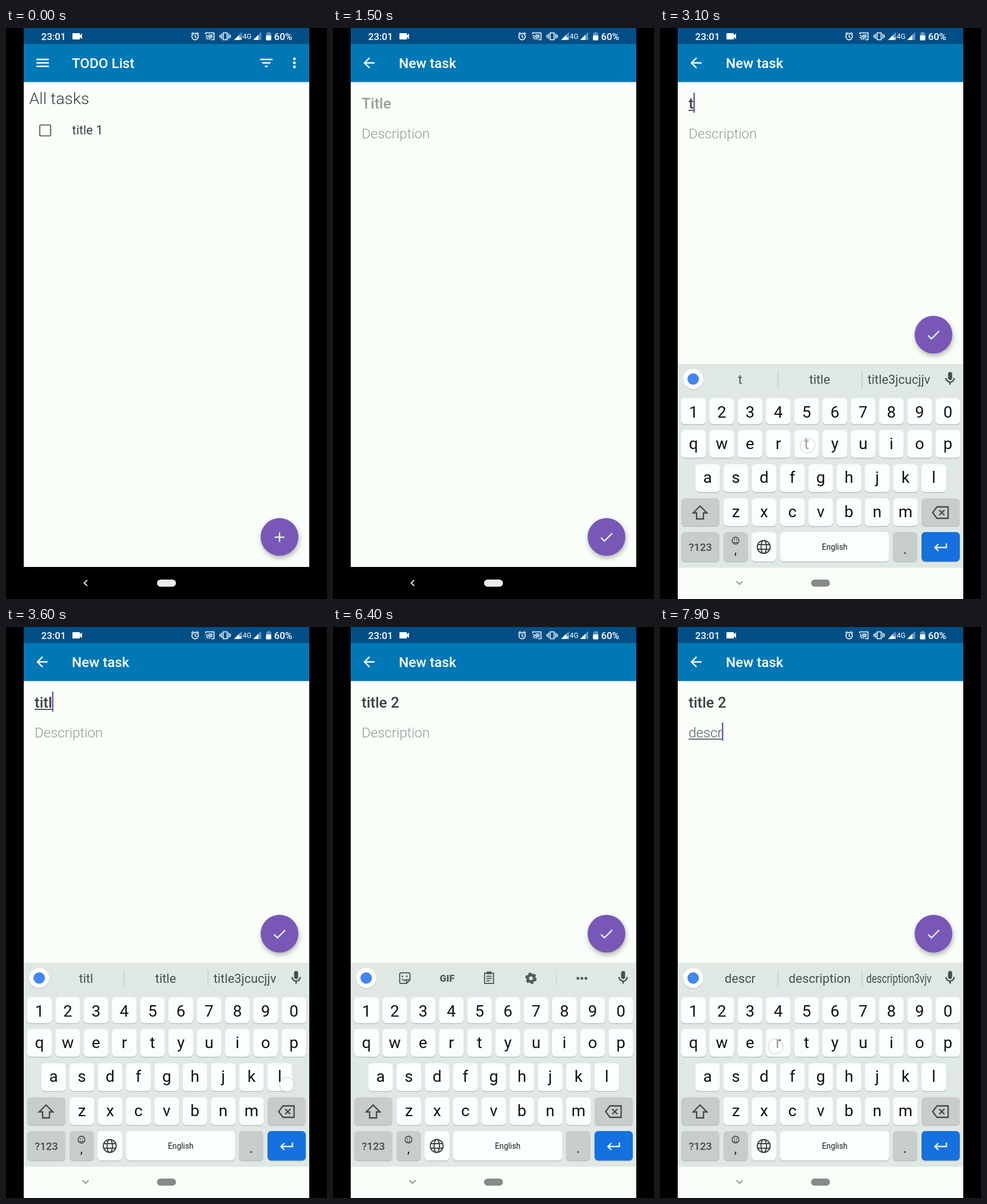
An HTML page that plays this animation: 561 by 998 pixels, repeating every 8000 ms.

```html
<!DOCTYPE html>
<html lang="en">
<head>
<meta charset="utf-8">
<title>New task</title>
<style>
html, body { margin: 0; width: 100%; height: 100%; overflow: hidden; background: #000; }
svg { display: block; width: 561px; height: 998px; font-family: Roboto, sans-serif; }
.mid { text-anchor: middle; }
.line { fill: none; stroke-width: 2; }
.fab { filter: drop-shadow(1px 4px 4px rgba(0, 0, 0, .3)); }
</style>
</head>
<body>
<svg id="stage" viewBox="0 0 561 998"></svg>
<script>
const LOOP = 8000, PAGE = '#f9fff8', BAR = '#0178b6', KEY = '#fafffb', DIM = '#c6cdcb', INK = '#545b5c';
const stage = document.getElementById('stage');
const $ = id => document.getElementById(id);

// Markup helpers
const text = (s, x, y, size, fill, weight = 400, extra = '') =>
  `<text x="${x}" y="${y}" font-size="${size}" fill="${fill}" font-weight="${weight}" ${extra}>${s}</text>`;
const mid = (s, x, y, size, fill, weight) => text(s, x, y, size, fill, weight, 'class="mid"');
const rect = (x, y, w, h, fill, r = 0, extra = '') =>
  `<rect x="${x}" y="${y}" width="${w}" height="${h}" rx="${r}" fill="${fill}" ${extra}/>`;
const disc = (x, y, r, fill, extra = '') => `<circle cx="${x}" cy="${y}" r="${r}" fill="${fill}" ${extra}/>`;
const line = (d, stroke, w = 2) => `<path class="line" d="${d}" stroke="${stroke}" style="stroke-width:${w}"/>`;
const icon = (d, x, y, fill = '#fff', s = 1.21) =>
  `<path d="${d}" fill="${fill}" transform="translate(${x} ${y}) scale(${s}) translate(-12 -12)"/>`;
const group = (id, body, extra = '') => `<g id="${id}" ${extra}>${body}</g>`;

const ICON = {
  menu: 'M3 18h18v-2H3zm0-5h18v-2H3zm0-7v2h18V6z',
  filter: 'M10 18h4v-2h-4zM3 6v2h18V6zm3 7h12v-2H6z',
  back: 'M20 11H7.83l5.59-5.59L12 4l-8 8 8 8 1.41-1.41L7.83 13H20z',
  check: 'M9 16.17L4.83 12l-1.42 1.41L9 19 21 7l-1.41-1.41z',
  add: 'M19 13h-6v6h-2v-6H5v-2h6V5h2v6h6z',
  video: 'M17 10.5V7q0-1-1-1H4q-1 0-1 1v10q0 1 1 1h12q1 0 1-1v-3.5l4 4v-11z',
  mic: 'M12 14c1.66 0 3-1.34 3-3V5a3 3 0 0 0-6 0v6c0 1.66 1.34 3 3 3zm5-3a5 5 0 0 1-10 0H5c0 3.5 2.6 6.4 6 6.9V21h2v-3.1c3.4-.5 6-3.4 6-6.9z'
};

function statusBar() {
  const signal = x => `<path d="M${x} 21h14v-14z" fill="#5f93bb"/><path d="M${x} 21h9v-9z" fill="#fff"/>`;
  return rect(31, 0, 499, 28, '#014f86') +
    text('23:01', 61.5, 21, 17, '#fff', 500) + icon(ICON.video, 124.5, 14.5, '#fff', .93) +
    disc(330.5, 15, 5.6, 'none', 'stroke="#fff" stroke-width="1.6"') +
    line('M330.5 11.5v4l2.5 1.5M324 10.5l3.5-3M337 10.5l-3.5-3', '#fff', 1.5) +
    line('M349 11v-2.5h14.5v12h-5M349 20v.5M349 16.5a4 4 0 0 1 4 4M349 13.2a7.3 7.3 0 0 1 7.3 7.3', '#fff', 1.6) +
    rect(354, 11, 7, 7, '#9dbdd6') +
    line('M379.5 8.5h7v12h-7zM376.6 10v9M389.4 10v9M374 12v5M392 12v5', '#fff', 1.6) +
    signal(398.5) + line('M407.5 16.5l4 4m0-4l-4 4', '#fff', 1.3) +
    text('4G', 413.5, 19, 12.5, '#fff') + signal(432) +
    rect(454.5, 8.5, 9, 13, '#5f93bb', 1) + rect(457, 7, 4, 2, '#5f93bb') + rect(454.5, 13, 9, 8.5, '#fff', 1) +
    text('60%', 468.5, 21, 17, '#fff', 500);
}

const fab = (id, d) => group(id, disc(478, 889.5, 33, '#7957b7', 'class="fab"') + icon(d, 478, 890, '#daf3df'));
const page = title => rect(31, 28, 499, 914, PAGE) + rect(31, 28, 499, 66.5, BAR) + text(title, 115, 70, 24.2, '#fff', 500);

const listPage = () => page('TODO List') + icon(ICON.menu, 64, 61) + icon(ICON.filter, 455, 61) +
  [54, 61, 68].map(y => disc(504, y, 2.4, '#fff')).join('') +
  text('All tasks', 40.5, 133, 28.5, '#383d3d', 300) +
  rect(59, 169.5, 19, 19, 'none', 2, 'stroke="#686c6c" stroke-width="2.2"') +
  text('title 1', 115.5, 186, 21.8, '#3d4141') + fab('addFab', ICON.add);

const field = (id, y, size, weight) => text('', 50, y, size, '#555', weight, `id="${id}" xml:space="preserve"`) +
  rect(50, y + 2.5, 0, 1.8, '#555', 0, `id="${id}Line"`);

const taskPage = () => page('New task') + icon(ICON.back, 63, 61) +
  field('title', 140.5, 26, 500) + field('desc', 192.5, 24, 300) +
  rect(0, 0, 2.4, 0, '#6c51a9', 0, 'id="cursor"') + fab('saveFab', ICON.check);

// Keyboard: keys sit on a grid of 49.4 px columns
const STEP = 49.4;
const key = (x, y, w, h, fill = KEY) => rect(x, y + 1.5, w, h, '#b9c1be', 6.5) + rect(x, y, w, h, fill, 6.5);
const keyRow = (letters, start, y, h, base) => [...letters].map((c, i) => {
  const x = 37 + (start + i) * STEP;
  return key(x, y, 43, h) + mid(c, x + 21.5, base, 28, '#111');
}).join('');

function toolbar() {
  return line('M119 604.5h13q2.5 0 2.5 2.5v10l-6 6h-9.500q-2.500 0-2.500-2.500v-13.500q0-2.500 2.500-2.500zM134 616.500h-5.500v6M120.500 615q4 5 7.500 1', INK) +
    disc(121.5, 610.5, 1.5, INK) + disc(129, 610.5, 1.5, INK) +
    mid('GIF', 199.5, 620, 17, INK, 900) +
    line('M265 605h15.500v18h-15.500zM268 610.500h9.500M268 614.500h9.500M268 618.500h6.500', INK) + rect(268.5, 602, 8.5, 5, INK, 1) +
    disc(346, 614, 5.8, 'none', `stroke="${INK}" stroke-width="5"`) +
    disc(346, 614, 8.6, 'none', `stroke="${INK}" stroke-width="3" stroke-dasharray="5 4.006"`) +
    rect(390, 601, 1, 26, '#c5cdca') + [428, 435, 442].map(x => disc(x, 614, 2.5, INK)).join('');
}

const hints = () => [206, 353].map(x => rect(x - .5, 600, 1.2, 28, '#b9c2bf')).join('') +
  [140, 279, 417.5].map((x, i) => `<g transform="translate(${x} 622)">${text('', 0, 0, 21.8, '#474e4f', 400, `class="mid" id="hint${i}"`)}</g>`).join('');

function keyboard() {
  return rect(31, 587, 499, 356, '#e0e8e4') +
    disc(58, 615, 17.5, '#c3cbc8') + disc(58, 613.5, 17.5, '#fdfffd') + disc(58, 613.5, 10, '#4285f4') +
    group('tools', toolbar()) + group('hints', hints()) + icon(ICON.mic, 507, 613, '#464d4e', 1.18) +
    keyRow('1234567890', 0, 647, 45.5, 681) + keyRow('qwertyuiop', 0, 702.5, 48.5, 736) +
    keyRow('asdfghjkl', .5, 762.5, 48.5, 795) + keyRow('zxcvbnm', 1.5, 822, 48.5, 854.5) +
    key(37, 822, 67, 48.5, DIM) + line('M70 835.500L58 847.500h6v10.500h12v-10.500h6z', '#414849', 2.3) +
    key(457, 822, 67, 48.5, DIM) + line('M476.500 847l7.500-10h19.500v20h-19.500zM488 842.500l9 9m0-9l-9 9', '#414849', 2.3) +
    key(37, 881, 67, 51.5, DIM) + mid('?123', 70.5, 914, 18.5, '#454c4d', 500) +
    key(111, 881, 42.5, 51.5, DIM) + disc(132, 896, 6, 'none', 'stroke="#333" stroke-width="1.3"') +
    disc(130, 894.5, 1, '#333') + disc(134, 894.5, 1, '#333') + line('M128.800 898q3.200 3.500 6.400 0', '#333', 1.2) +
    mid(',', 132, 919, 20, '#222', 500) +
    key(160, 881, 43, 51.5) + disc(181.3, 907, 11.3, 'none', 'stroke="#3e4546" stroke-width="2"') +
    `<ellipse class="line" cx="181.3" cy="907" rx="4.8" ry="11.3" stroke="#3e4546"/>` +
    line('M171 903h20.600M171 911h20.600', '#3e4546') +
    key(210, 881, 190.5, 51.5) + mid('English', 305.3, 912, 13.8, '#161a1a') +
    key(407, 881, 42.5, 51.5, DIM) + mid('.', 428.3, 919, 20, '#222', 500) +
    key(457, 881, 67, 51.5, '#1471df') + line('M500.500 901v7h-19.500M486.500 902l-6 6 6 6', '#eef6ff', 2.4);
}

const navBar = () => rect(31, 942, 499, 56, '#000') + line('M142 965l-5.500 5 5.500 5', '#eee', 1.8) +
  rect(264, 964, 33, 12.5, '#e9edeb', 6.2) +
  group('lightNav', rect(31, 942, 499, 56, '#f9fdf8') + rect(31, 942, 499, 1.3, '#d5dcd9') +
    line('M133.500 967l5.500 5.500 5.500-5.500', '#8d9391', 1.8) + rect(264, 964, 33, 12.5, '#858b88', 6.2));

stage.innerHTML = '<clipPath id="screen"><path d="M31 0h499v998H31z"/></clipPath>' +
  '<g clip-path="url(#screen)">' + listPage() + group('task', taskPage()) + statusBar() +
  navBar() + group('keys', keyboard()) +
  disc(0, 0, 13, 'rgba(255,255,255,.6)', 'id="touch" stroke="#8fa3b5" stroke-opacity=".55"') + '</g>';

// Taps: time, x, y, typed character, field
const TAPS = [
  [920, 480, 892], [1800, 88, 136],
  [3000, 258, 730, 't', 'title'], [3180, 406, 730, 'i', 'title'], [3340, 258, 732, 't', 'title'],
  [3520, 491, 800, 'l', 'title'], [3700, 160, 734, 'e', 'title'], [3950, 300, 910, ' ', 'title'],
  [4220, 110, 674, '2', 'title'], [5700, 491, 909],
  [6700, 233, 790, 'd', 'desc'], [6930, 160, 733, 'e', 'desc'], [7160, 134, 792, 's', 'desc'],
  [7400, 233, 850, 'c', 'desc'], [7820, 202, 733, 'r', 'desc']
];
const LAG = 60, HOLD = 130, OPEN = 1080, FOCUS = 2080, NEXT = 5760;
const FIELDS = {
  title: { hint: 'Title', ink: '#3b4040', faint: '#999e9a', word: 'title', tail: '3jcucjjv', top: 113, tall: 35 },
  desc: { hint: 'Description', ink: '#555a5a', faint: '#939994', word: 'description', tail: '3vjv', top: 167, tall: 32 }
};
const HINT_WIDTH = 114;

const ramp = (t, a, b) => Math.min(1, Math.max(0, (t - a) / (b - a)));
const easeOut = p => 1 - (1 - p) ** 3;
const show = (id, on) => $(id).setAttribute('opacity', +on);
const shift = (id, y) => $(id).setAttribute('transform', `translate(0 ${y})`);
const set = (el, attrs) => { for (const k in attrs) el.setAttribute(k, attrs[k]); };

function drawField(id, value, composing) {
  const f = FIELDS[id], el = $(id);
  el.textContent = value || f.hint;
  set(el, { fill: value ? f.ink : f.faint });
  const width = value ? el.getComputedTextLength() : 0;
  set($(id + 'Line'), { width: composing ? width : 0, fill: f.ink });
  return width;
}

// Long suggestions are condensed to their cell, as the keyboard does
function drawHints(f, value) {
  [value, f.word, f.word + f.tail].forEach((s, i) => {
    const el = $('hint' + i);
    el.textContent = s;
    set(el, { transform: `scale(${Math.min(1, HINT_WIDTH / el.getComputedTextLength())} 1)` });
  });
}

function render(t) {
  const open = easeOut(ramp(t, OPEN, OPEN + 280));
  show('task', open);
  shift('task', 38 * (1 - open));

  const rise = easeOut(ramp(t, 1960, 2240));
  show('keys', rise > 0);
  shift('keys', 411 * (1 - rise));
  show('lightNav', ramp(t, 1960, 2120));
  shift('saveFab', t < FOCUS ? 0 : -353.5);

  const typed = TAPS.filter(k => k[3] && t >= k[0] + LAG);
  const valueOf = id => typed.filter(k => k[4] === id).map(k => k[3]).join('');
  const active = t < NEXT ? 'title' : 'desc';
  const f = FIELDS[active], value = valueOf(active);
  const composing = value !== '' && !value.includes(' ');
  const widths = {};
  for (const id in FIELDS) widths[id] = drawField(id, valueOf(id), composing && id === active);

  const last = Math.max(FOCUS, t < NEXT ? 0 : NEXT, ...typed.map(k => k[0] + LAG));
  show('cursor', t >= FOCUS && (t - last) % 1000 < 500);
  set($('cursor'), { x: 49.8 + widths[active], y: f.top, height: f.tall });

  show('tools', !composing);
  show('hints', composing);
  if (composing) drawHints(f, value);

  const tap = TAPS.find(k => t >= k[0] && t < k[0] + HOLD);
  show('touch', tap ? 1 : 0);
  if (tap) set($('touch'), { cx: tap[1], cy: tap[2] });
}

const start = performance.now();
function tick() {
  render((performance.now() - start) % LOOP);
  requestAnimationFrame(tick);
}
tick();
</script>
</body>
</html>
```
